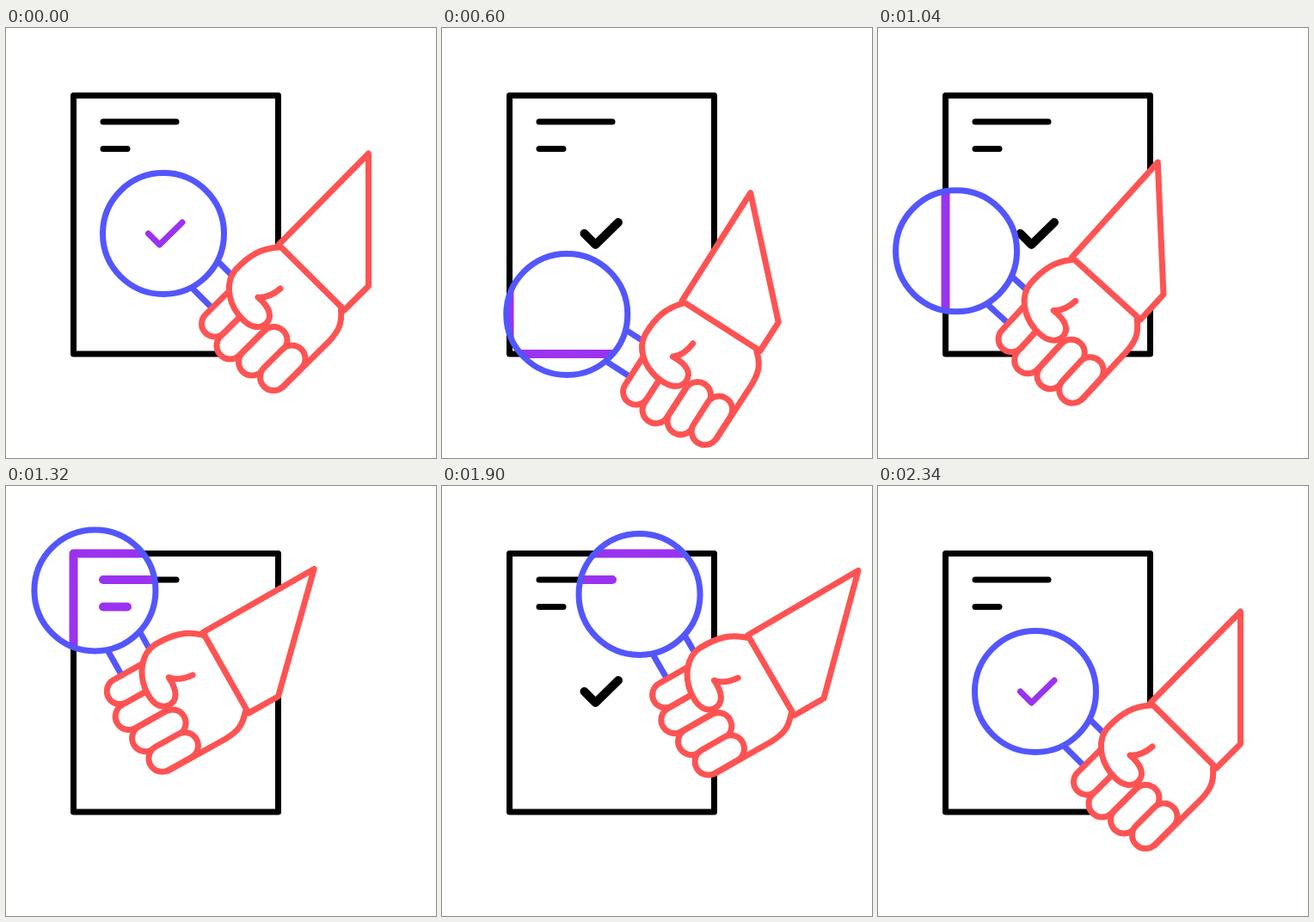
An HTML page for the animation above (2500 ms loop, 500 px wide and 500 px high).

```html
<!DOCTYPE html>
<html lang="en">
<head>
<meta charset="utf-8">
<title>Document check</title>
<style>
  html, body { margin: 0; width: 100%; height: 100%; overflow: hidden; background: #fff; }
  svg { display: block; width: 100%; height: 100%; }
  .line { stroke-width: 7; stroke-linecap: round; stroke-linejoin: round; fill: none; }
  .bold { stroke-width: 10; }
  .ink { stroke: #000; }
  .violet { stroke: #9a33f0; }
  .blue { stroke: #5356ff; }
  .red { stroke: #ff5353; }
  .white { fill: #fff; }
</style>
</head>
<body>
<svg viewBox="0 0 500 500">
  <defs>
    <path id="page" d="M78.5 78.5H316.5V379H78.5ZM113 109H198M113 140.5H141"/>
    <path id="tick" d="M165.5 239L178.5 252L205 226"/>
    <clipPath id="glass"><circle class="spot" r="70.5"/></clipPath>
  </defs>

  <use href="#page" class="line ink"/>
  <use href="#tick" class="line ink bold"/>

  <g class="arm">
    <path class="white" d="M246 271L276 301L246 332L216 302Z"/>
    <path class="line blue" d="M246.5 271.5L268 293M216 302L242 328"/>
  </g>

  <circle class="spot white" r="70.5"/>
  <g clip-path="url(#glass)">
    <use href="#page" class="line violet bold"/>
    <use href="#tick" class="line violet"/>
  </g>
  <circle class="spot line blue" r="70.5"/>

  <g class="arm">
    <g id="back"></g>
    <path class="white" d="M317 255C298 256 284 263 267 281C255 295 258 317 270 333C281 347 292 351 301 345L312 370L322 417L376 364C386 353 391 345 390 328Z"/>
    <path class="line red" d="M317 255C298 256 284 263 267 281C255 295 258 317 270 333C281 347 292 351 301 345C311 337 307 325 293 313C303 314 312 309 319 303"/>
    <path class="line red" d="M389.5 328C391 345 386 353 376 364L322 417.5"/>
    <g id="front"></g>
    <path class="line red" style="fill:#fff" d="M317 252L421.5 146V300L393.5 328Z"/>
  </g>
</svg>
<script>
  const LOOP = 2500;
  const HOME = { x: 183, y: 239 };

  // time, lens x, lens y, arm angle, bend of x on the way in
  const poses = [
    [0, 183, 239, 0, 1],
    [340, 207, 333, -12.2, 1],
    [842, 90.5, 333, -12.2, 1],
    [1345, 103.7, 120, 15.9, 3],
    [1833, 232, 120, 15.9, 1],
    [2335, 183, 239, 0, 1]
  ];

  // Finger lying at 45 degrees, from its tip up by a given run
  function finger(parent, x, y, run, r) {
    const k = r * Math.SQRT1_2;
    const arc = `A${r} ${r} 0 0 1 `;
    const path = document.createElementNS("http://www.w3.org/2000/svg", "path");
    path.setAttribute("d",
      `M${x - k} ${y - k}L${x + run - k} ${y - run - k}` +
      `${arc}${x + run + k} ${y - run + k}` +
      `L${x + k} ${y + k}${arc}${x - k} ${y - k}Z`);
    path.setAttribute("class", "line red");
    path.style.fill = "#fff";
    document.getElementById(parent).append(path);
  }

  finger("back", 260.5, 369.5, 36, 15.5);
  finger("back", 242.5, 344, 36, 15);
  finger("front", 286, 388.5, 25.5, 15.5);
  finger("front", 311, 406, 21.5, 15.5);

  const spots = document.querySelectorAll(".spot");
  const arms = document.querySelectorAll(".arm");
  const ease = u => u * u * (3 - 2 * u);
  const mix = (a, b, p) => a + (b - a) * p;

  function poseAt(t) {
    const i = poses.findIndex(p => p[0] > t);
    if (i < 0) return poses[poses.length - 1].slice(1, 4);
    const a = poses[i - 1], b = poses[i];
    const p = ease((t - a[0]) / (b[0] - a[0]));
    return [mix(a[1], b[1], p ** b[4]), mix(a[2], b[2], p), mix(a[3], b[3], p)];
  }

  function draw(t) {
    const [x, y, angle] = poseAt(t);
    for (const s of spots) {
      s.setAttribute("cx", x);
      s.setAttribute("cy", y);
    }
    const move = `translate(${x} ${y}) rotate(${angle}) translate(${-HOME.x} ${-HOME.y})`;
    for (const a of arms) a.setAttribute("transform", move);
  }

  const start = performance.now();
  function frame() {
    draw((performance.now() - start) % LOOP);
    requestAnimationFrame(frame);
  }
  frame();
</script>
</body>
</html>
```
